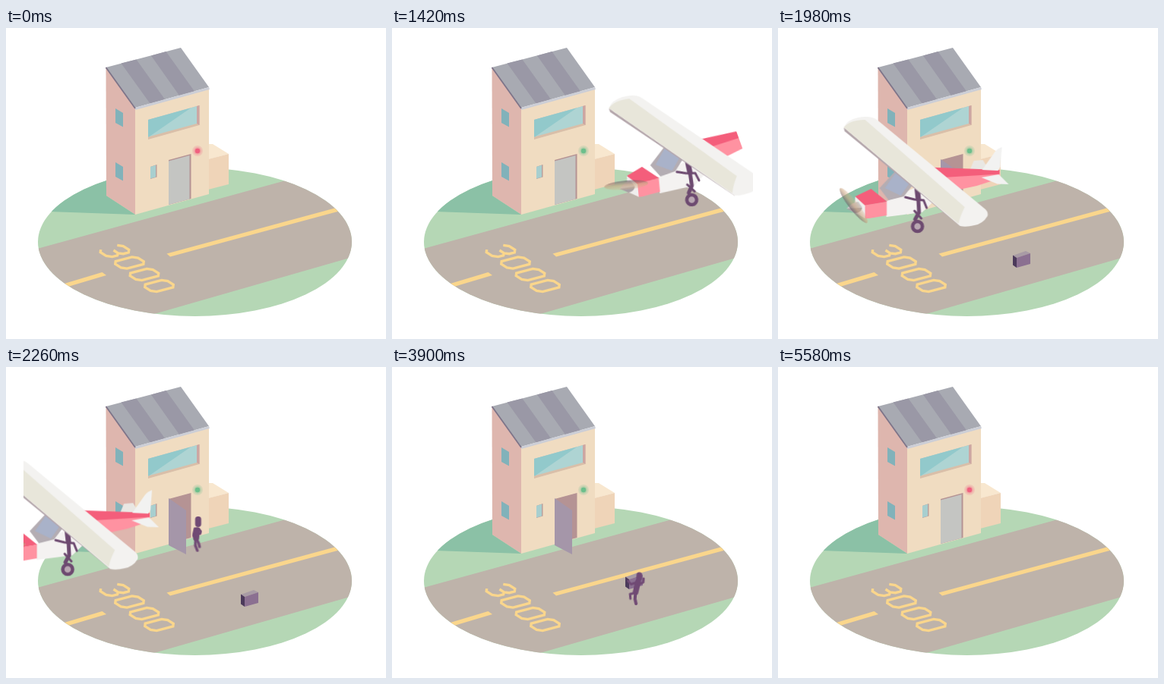
These frames come from a looping animation (500x410 px, 6780 ms). An HTML page:

```html
<!DOCTYPE html>
<html lang="en">
<head>
<meta charset="utf-8">
<title>Airstrip delivery</title>
<style>
  html, body { margin: 0; width: 100%; height: 100%; overflow: hidden; background: #fff; }
  svg { display: block; width: 500px; height: 410px; }

  .plane, .pitch, .lamp, .leaf, .parcel, .person, .shown, .walking, .carrying, .lean {
    animation: 6780ms linear infinite;
  }
  .plane { animation-name: fly; transform-origin: 100px 238px; }
  .pitch { animation-name: pitch; transform-origin: 200px 195px; }
  .prop { animation: spin 211.875ms linear infinite; transform-origin: 100px 234px; }
  .lamp { animation-name: lamp; }
  .leaf { animation-name: door; }
  .parcel { animation-name: parcel; }
  .person { animation-name: walk; }
  .shown { animation-name: shown; animation-timing-function: step-end; }
  .parcelShown { animation-name: parcelShown; }
  .walking { animation-name: walking; animation-timing-function: step-end; }
  .carrying { animation-name: carrying; animation-timing-function: step-end; }
  .lean { animation-name: lean; }
  .leg { animation: stride 565ms ease-in-out infinite; transform-origin: 0 -15px; }
  .leg.other { animation-direction: reverse; }

  @keyframes fly {
    0%, 13.27% { transform: translate(403px, -62px) rotate(-6deg); }
    20.94% { transform: translate(209px, -27px) rotate(-5.5deg); }
    23.89% { transform: translate(134px, -13px) rotate(-3deg); }
    29.2% { transform: translate(0, 0) rotate(0deg); }
    38.64% { transform: translate(-234px, 12px) rotate(0deg); }
    42.77%, 100% { transform: translate(-336px, 16px) rotate(0deg); }
  }
  @keyframes pitch {
    0%, 20.94% { transform: rotate(-9deg); }
    29.2%, 100% { transform: rotate(0deg); }
  }
  @keyframes spin {
    from { transform: rotate(-74deg); }
    to { transform: rotate(286deg); }
  }
  @keyframes lamp {
    0%, 5.01%, 70.8%, 100% { fill: #f0607f; }
    7.96%, 67.85% { fill: #6cbf8b; }
  }
  @keyframes door {
    0%, 24.19%, 81.71%, 100% {
      fill: #c4c5c2;
      clip-path: polygon(214px 175.5px, 241.5px 168px, 241.5px 225.5px, 214px 233px);
    }
    25.96%, 80.24% {
      fill: #b4adb5;
      clip-path: polygon(214px 174px, 244px 180px, 244px 238px, 214px 234px);
    }
    27.73%, 78.76% {
      fill: #a596a9;
      clip-path: polygon(214px 173px, 237px 189px, 237px 247px, 214px 235px);
    }
  }
  @keyframes parcel {
    0%, 21.53% { transform: translate(15px, -85px); animation-timing-function: ease-in; }
    24.19%, 53.39% { transform: translate(0, 0); }
    56.05%, 59% { transform: translate(-2px, -23px); }
    63.42% { transform: translate(-8px, -46px); }
    72.86% { transform: translate(-47px, -86px); }
    78.17%, 100% { transform: translate(-93px, -110px); }
  }
  @keyframes walk {
    0%, 29.5% { transform: translate(228px, 229px); }
    38.64% { transform: translate(281px, 262px); }
    43.95% { transform: translate(283px, 283px); }
    53.1% { transform: translate(318px, 312px); }
    57.52%, 59% { transform: translate(320px, 314px); }
    63.42% { transform: translate(314px, 292px); }
    72.86% { transform: translate(275px, 254px); }
    78.17%, 100% { transform: translate(229px, 229px); }
  }
  @keyframes shown { 0%, 78.17%, 100% { opacity: 0; } 29.5% { opacity: 1; } }
  @keyframes parcelShown { 0%, 78.17%, 100% { opacity: 0; } 21.53% { opacity: 1; } }
  @keyframes walking { 0% { opacity: 1; } 53.83%, 100% { opacity: 0; } }
  @keyframes carrying { 0% { opacity: 0; } 53.83%, 100% { opacity: 1; } }
  @keyframes lean {
    0%, 53.83%, 59% { transform: rotate(5deg); }
    63.42%, 100% { transform: rotate(0deg); }
  }
  @keyframes stride {
    0%, 100% { transform: rotate(-14deg); }
    50% { transform: rotate(14deg); }
  }
</style>
</head>
<body>
<svg viewBox="0 0 500 410">
  <defs>
    <clipPath id="island"><ellipse cx="248.5" cy="282" rx="206.5" ry="98"/></clipPath>
    <clipPath id="sky"><rect x="23" width="452" height="410"/></clipPath>
    <clipPath id="tailSky"><path d="M23 0H404L475 197V410H23Z"/></clipPath>
    <linearGradient id="blade" x2="0" y2="1">
      <stop offset="0" stop-color="#d9b48c" stop-opacity=".25"/>
      <stop offset=".5" stop-color="#c9a37f" stop-opacity=".6"/>
      <stop offset="1" stop-color="#5f5260" stop-opacity=".6"/>
    </linearGradient>
    <path id="zero" vector-effect="non-scaling-stroke"
      d="M-.25-.5H.25L.5-.36V.36L.25 .5H-.25L-.5 .36V-.36Z"/>
    <path id="three" vector-effect="non-scaling-stroke"
      d="M-.5 .36L-.25 .5H.25L.5 .36V.13L.3 0H-.1M.3 0L.5-.13V-.36L.25-.5H-.25L-.5-.36"/>
  </defs>

  <!-- Ground and runway -->
  <g clip-path="url(#island)">
    <path fill="#b5d7b5" d="M40 180H460V385H40Z"/>
    <path fill="#8bc1a6" d="M40 241.5L170 246L132 221V180H40Z"/>
    <path fill="#beb3aa" d="M30 294L368 201L470 173V298L195 377L150 390H30Z"/>
    <path fill="#fad68c" d="M211.500 297.500L440 235.500V241L216 301.500ZM70 339L126.500 322L132 326L75 343Z"/>
  </g>
  <g fill="none" stroke="#fad68c" stroke-width="3.4">
    <use href="#three" transform="matrix(15 9.500 30 -8 143 294)"/>
    <use href="#zero" transform="matrix(15 9.500 30 -8 162.500 309.500)"/>
    <use href="#zero" transform="matrix(15 9.500 30 -8 182 325)"/>
    <use href="#zero" transform="matrix(15 9.500 30 -8 201.500 340)"/>
  </g>

  <!-- House -->
  <path fill="#f8e7cf" d="M266 153H272L293 166L267 173Z"/>
  <path fill="#efd4b8" d="M266 173L293 166V206L266 213Z"/>
  <path fill="#deb6ae" d="M131.500 52L170.500 106V246L132 221Z"/>
  <path fill="#f0dcc1" d="M170 106L267 79V219L170 246Z"/>
  <path fill="#a8aab2" d="M131.500 52L230 26L267 78L170 105Z"/>
  <path fill="#9a98a6" d="M151.500 46.500L171.500 41.500L209 94L189.500 99.500ZM191 36.500L210.500 31L248 83.500L228 89Z"/>
  <path fill="none" stroke="#ccced6" stroke-width="3" d="M170 106.500L267.500 79.500"/>
  <path fill="none" stroke="#7d7489" stroke-width="1.800" d="M131.500 52L170 106"/>
  <path fill="#81b2ba" d="M144 106L154 112V130.500L144 125ZM144 177L154 183V201.500L144 196Z"/>
  <path fill="#d9bfa9" d="M187 121L254.500 102V128L187 147Z"/>
  <path fill="#cda6a2" d="M251 103L254.500 102V128L251 126Z"/>
  <path fill="#aed4d3" d="M187 121L251 103V126L187 143.500Z"/>
  <path fill="#92c9cb" d="M187 121L243 105.500L188 143.500H187Z"/>
  <path fill="#b99f9c" d="M190 183L198.500 180V196.500L190 199Z"/>
  <path fill="#a8cfcf" d="M190 183L197 180.800V196.500L190 198.500Z"/>
  <g class="lamp">
    <circle cx="252" cy="162" r="7" opacity=".18"/>
    <circle cx="252" cy="162" r="5" opacity=".28"/>
    <circle cx="252" cy="162" r="3.200"/>
  </g>
  <path fill="#b59394" d="M214 174L243.500 166V225L214 233Z"/>

  <g class="shown parcelShown">
    <g class="parcel">
      <path fill="#a89ba5" d="M309 300L326 294L332 297L314 303Z"/>
      <path fill="#4c3a5b" d="M309 299.500L314 303V316L309 312.500Z"/>
      <path fill="#8b7091" d="M314 303L332 297V311L314 316Z"/>
    </g>
  </g>

  <g class="shown">
    <g class="person" fill="none" stroke="#704a74" stroke-linecap="round" stroke-linejoin="round">
      <g class="walking">
        <path stroke-width="8" d="M2.500-42V-36"/>
        <path stroke-width="7.500" d="M1-28L0-17"/>
        <path stroke-width="3" d="M-2-30L-4-21L-2-16M3-30L6-26L5-23"/>
        <path class="leg" stroke-width="3.500" d="M-1-15L-3-8L-2-1"/>
        <path class="leg other" stroke-width="3.500" d="M1-15L2-10V-5"/>
      </g>
      <g class="carrying">
        <g class="lean">
          <path stroke-width="7.500" d="M2-40V-36"/>
          <path stroke-width="7.500" d="M1-31L-1-17"/>
          <path stroke-width="3" d="M-1-30L-8-27L-12-31M3-28L8-31V-36"/>
          <path stroke-width="3" d="M-2-16L-8-14L-7-8"/>
          <path stroke-width="4" d="M-1-15L-1-8L1-2"/>
        </g>
      </g>
    </g>
  </g>
  <rect class="leaf" width="500" height="410"/>

  <!-- Aircraft -->
  <g clip-path="url(#tailSky)">
    <g class="plane"><g class="pitch">
      <path fill="#e9e7e3" d="M253 187L258 175L270 174L278 187Z"/>
      <path fill="#f45e7b" d="M185 183L292 187V193L235 200H195Z"/>
      <path fill="#ff92a1" d="M200 198L292 192.500L293 198L262 208L220 217Z"/>
      <path fill="#f2f2f1" d="M269 187L286 163Q289 159 295 157L293 183L290 188ZM268 197L291 193L304 206L289 205.500Z"/>
    </g></g>
  </g>
  <g clip-path="url(#sky)">
    <g class="plane">
      <path fill="#f4f2f1" d="M142 229L185 208L212 222L190 243L143 249Z"/>
      <path fill="#b4adb3" d="M134 211L160 183L187 195L166 222L146 227Z"/>
      <path fill="#a9b2c9" d="M141 211L157 188L178 198L162 221Z"/>
      <path fill="#f0eeed" d="M102 222L115 233V251L101 243Z"/>
      <path fill="#f45e7b" d="M102 222L123 212L144 229L115 234Z"/>
      <path fill="#ff92a1" d="M115 233.500L143.500 229V247L120 251H115Z"/>
      <path fill="#cbc7c8" d="M91 238Q97 230 106 229L111 236Q110 243 102 244Z"/>
      <path fill="#a69fa3" d="M91 238L111 237Q110 243 102 244Z"/>
      <ellipse class="prop" cx="100" cy="234" rx="29" ry="6" fill="url(#blade)"/>
      <g fill="none" stroke="#6d4a70" stroke-linecap="round" stroke-linejoin="round">
        <path stroke-width="7" d="M183 207L185 225"/>
        <path stroke-width="5" d="M185 225L186 243L181 252"/>
        <path stroke-width="3" d="M168 223L180 226L192 227L196 237M180 241L189 251"/>
        <circle cx="184" cy="261.500" r="6.500" fill="#b9a7b2" stroke-width="4.500"/>
      </g>
      <path fill="#b4a6ab" d="M87 131L238 257L241 262L88 136Z"/>
      <path fill="#f3f2f0" d="M87 131Q91 121 106 118Q124 115 132 122L271 237Q278 242 276 248Q270 258 259 260Q248 263 240 261Z"/>
      <path fill="#e8e6da" d="M87 131Q95 121 115 121L246 236Q240 248 238 258Z"/>
    </g>
  </g>
</svg>
</body>
</html>
```
